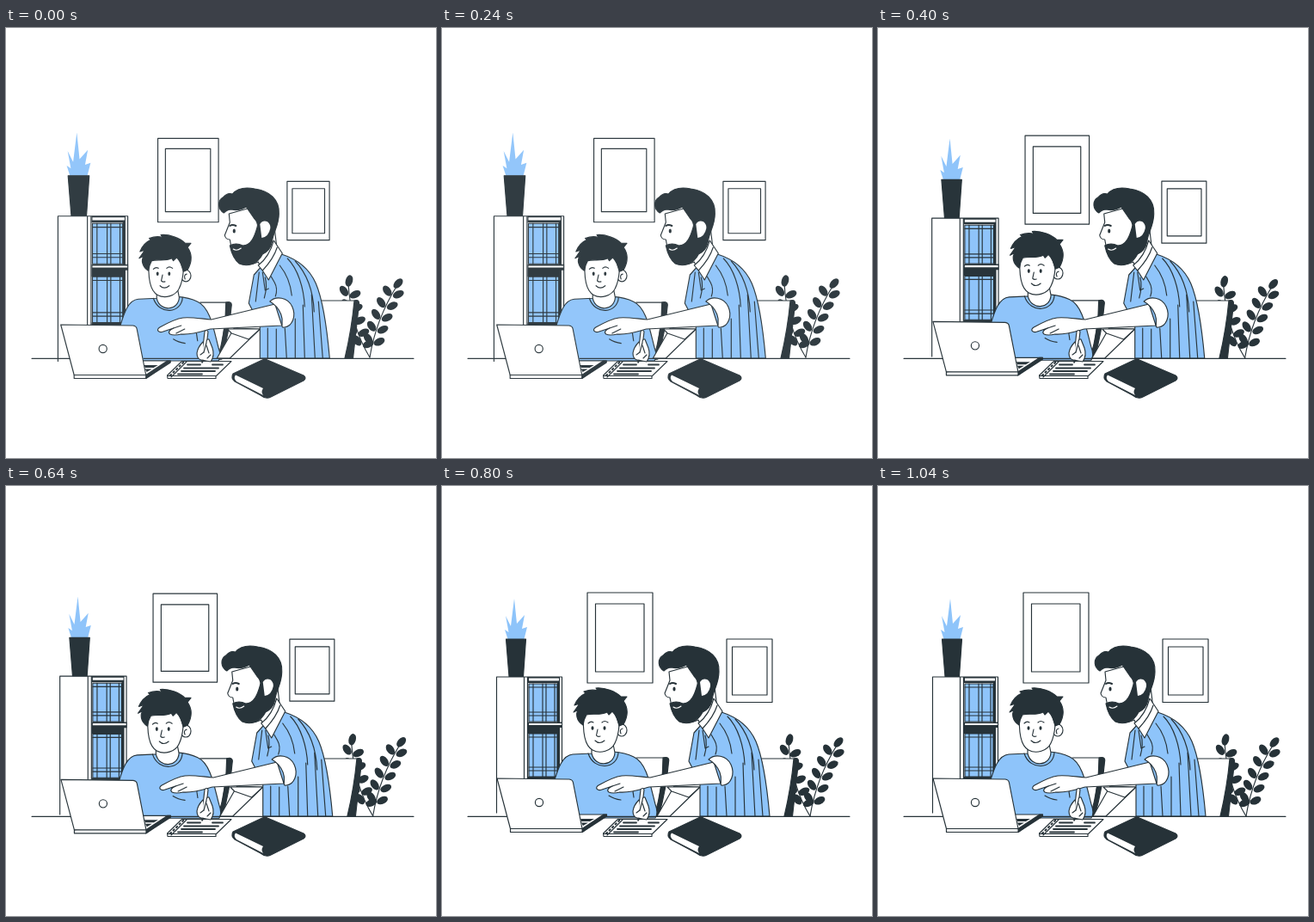
These frames come from a looping animation (500 px wide and 500 px high, 1.2 s). An HTML page:

```html
<!DOCTYPE html>
<html lang="en">
<head>
<meta charset="utf-8">
<title>Homework help</title>
<style>
  html, body { margin: 0; width: 100%; height: 100%; overflow: hidden; background: #fff; }
  svg { display: block; width: 100%; height: 100%; }
  path, rect, circle, ellipse {
    fill: none; stroke: #263238; stroke-width: 1.15;
    stroke-linecap: round; stroke-linejoin: round; vector-effect: non-scaling-stroke;
  }
  .white { fill: #fff; }
  .blue { fill: #8ec4fa; }
  .dark { fill: #263238; }
  .bare { stroke: none; }
</style>
</head>
<body>
<svg id="scene" viewBox="0 0 500 500">
  <g id="pictures">
    <rect x="169" y="124" width="76" height="105"/>
    <rect x="178.5" y="137" width="56.5" height="79"/>
    <rect x="331" y="178" width="53" height="73.5"/>
    <rect x="337.5" y="187" width="40.5" height="56"/>
  </g>

  <g id="shelf">
    <path class="blue bare" d="M84 131L87 160L96 150L93 166L99 164L95.500 178H76.500L73 167L77.500 170L74 151L80 163Z"/>
    <path class="dark" d="M74.500 178H97.500L94.500 221.500H78Z"/>
    <path d="M63.500 380V222H139.500V345M95.500 222V345M99.500 222V345"/>
    <path class="dark bare" d="M100 222H137V345H134V229H100ZM100 274.500H140V281H100ZM100 281H135V288H100ZM100 338H136V345H100Z"/>
    <path class="white bare" d="M101 223.500H136V226.500H101ZM101 276H139V278H101Z"/>
    <g id="books"></g>
  </g>

  <g id="leaves"></g>

  <g id="rightChair">
    <path class="white bare" d="M365 317H410L402 384H365Z"/>
    <path d="M366 317H411"/>
    <path class="dark" d="M409 317Q415 315 414.500 321L407.500 384H398Q406 350 409 317Z"/>
  </g>

  <g id="boy">
    <path class="white" d="M226 316H259L250 384H226"/>
    <path class="dark" d="M257 316Q265 314 263.500 321Q261 352 252 384H247Q257 350 257 316Z"/>
    <path class="blue" d="M174 311L152 312C140 313 135 328 130 345L145 386H248Q252 381 248 370C242 347 238 322 223 315Q213 310 199 309Z"/>
    <path d="M218 338Q222 350 223 362M208 365Q200 364 194 360"/>
    <path class="white" d="M174 303V311C178 328 200 326 201 310L199 300"/>
    <path d="M170 311C177 332 204 329 205 310"/>
    <ellipse class="white" cx="209" cy="284" rx="6" ry="7"/>
    <path class="white" d="M165 262C163 286 166 302 175 307C184 312 197 308 201 299Q205 291 206 278L200 260Z"/>
    <path class="dark" d="M164 278C156 273 155 264 159 260L153 263L160 253L154 255Q158 245 167 241L165 239Q174 236 181 238L179 235C189 234 202 239 208 245L215 245L211 250C218 260 215 270 211 277L206 279Q204 268 198 262L194 266L192 263C184 267 175 264 168 266Q165 271 164 278Z"/>
    <path d="M170 276Q173 273 176 275M186 275Q189 272 193 275M181 283L179.500 290Q181 292 184 291M178 296Q183 301 189 296M210 282Q206 283 208 288"/>
    <ellipse class="dark bare" cx="175" cy="281.500" rx="1.500" ry="2.300"/>
    <ellipse class="dark bare" cx="189" cy="281.500" rx="1.500" ry="2.300"/>
  </g>

  <g id="man">
    <path class="white" d="M270 349L250 384H265L300 350Z"/>
    <path class="white" d="M262 350H300L287 362L267 355Z"/>
    <path class="blue" d="M302 277L293 287L287 320L300 345V384H381C378 350 374 318 365 297C358 281 344 269 325 263Z"/>
    <path d="M299 284L295 318M306 290Q309 300 305 314M313 289L317 296Q321 303 318 312M323 276Q335 291 337 311M332 268C344 280 351 302 352 324M341 271C355 286 362 307 363 330M309 349V384M319 350V384M329 349L331 384M341 338V384M350 322L352 384M360 310L364 384M368 318L373 384"/>
    <path class="white" d="M264 216L265 226L259 241Q260 246 265 246L268 262Q280 281 298 272L302 281L320 259L316 225L300 206Z"/>
    <path class="white" d="M316 247L326 262L310 293L303 282L298 276Q311 266 316 247Z"/>
    <path d="M320 255Q316 268 303 282M303 284L306 305L310 303"/>
    <path class="dark" d="M258 215C251 211 250 201 257 197Q262 191 268 193C274 186 284 185 294 187C311 189 323 200 322 216C322 230 315 238 314 249Q312 259 303 263C297 275 285 278 276 274Q268 268 265 253Q272 249 280 253C290 253 294 242 297 231Q298 226 293 221L284 208Q276 213 267 211Q262 211 258 215Z"/>
    <path class="white bare" d="M300 228C304 221 313 225 312 233Q310 243 302 244Z"/>
    <path style="stroke-width:2" d="M265 230Q268 228 272 230"/>
    <ellipse class="dark bare" cx="270" cy="236" rx="1.600" ry="2.600"/>
    <path style="stroke:#fff" d="M269 257Q273 260 278 256"/>
  </g>

  <path d="M30 384.300H79M160 384.300H474"/>

  <g id="arm">
    <path class="white" d="M316 321L242 339C229 338 219 336 209 337C200 338 191 343 182 348C177 351 181 355 186 353L198 349Q190 353 194 356Q198 358 207 356C219 357 230 353 241 350L324 346Z"/>
    <path d="M198 349L207 346M201 355L211 350"/>
    <path class="white" d="M310 318C317 311 331 313 336 324C341 335 336 347 327 348C321 349 327 343 323 333Q319 323 310 318Z"/>
  </g>

  <g id="laptop">
    <path class="white" d="M79.500 398.500L158 382H191.500L163 402.500H79.500Z"/>
    <path class="dark" d="M163 398.500L188 382H191.500V384L163 402.500Z"/>
    <path class="dark bare" d="M161 387H177L172 390H162ZM162 391.500H170L164 395Z"/>
    <path class="white" d="M64 340L148 341Q152 341.500 152.500 345L163 398.500H79.500Z"/>
    <circle cx="113" cy="368" r="4.600"/>
  </g>

  <path class="white" d="M187.500 404L204.500 387.500H262L244 405V407.500H188Z"/>
  <path d="M187.500 404.500H244M192 406L210 388"/>
  <path style="stroke-width:1.800" d="M211 391.500H226M240 391.500H252M207 395.500H247M204 399H243M200 402.500H228"/>
  <path style="stroke-width:2;stroke-dasharray:1.500 3.500" d="M191 404L207 388"/>
  <path class="white" d="M231 353Q233 350 235 353L231.500 385L228 389L227.500 384Z"/>
  <path class="white" d="M229 365Q223 371 222 378Q222 385 227 386L238 388Q243 381 240 372L236 362Q233 361 233 366L230 377"/>
  <path d="M233 369L236 378M230 377L226 380M229 386L228 389M234 384L238 380"/>

  <path class="dark" d="M264 402L299 385.500Q301 384.500 304 386L346 404Q350 407 346 410L308 429Q302 432 296 427L266 411Q261 407 264 402Z"/>
  <path class="white bare" d="M267 403.500L299 419Q296 423 299 427L268 411Q264 407 267 403.500Z"/>
</svg>
<script>
const byId = id => document.getElementById(id);

function add(parent, tag, attributes) {
  const node = document.createElementNS("http://www.w3.org/2000/svg", tag);
  for (const name in attributes) node.setAttribute(name, attributes[name]);
  byId(parent).append(node);
}

// Two rows of ring binders
for (const [top, bottom] of [[230, 274], [288, 338]]) {
  add("books", "rect", { class: "blue", x: 101, y: top, width: 33, height: bottom - top });
  for (const x of [106, 117, 121, 131]) {
    add("books", "path", { d: `M${x} ${top}V${bottom}` });
  }
  for (const y of [top + 4, bottom - 11, bottom - 7]) {
    add("books", "path", { d: `M101 ${y}H134` });
  }
}

function leaf(x, y, angle) {
  add("leaves", "ellipse", {
    class: "dark bare", rx: 6.8, ry: 4.2, transform: `translate(${x} ${y}) rotate(${angle})`
  });
}

// Leaf pairs hang on a quadratic stem between two points
function branch(from, bend, to, pairs) {
  add("leaves", "path", { d: `M${from}Q${bend} ${to}` });
  for (let i = 0; i < pairs; i++) {
    const t = 0.22 + 0.66 * i / (pairs - 1);
    const [x, y] = [0, 1].map(k =>
      (1 - t) ** 2 * from[k] + 2 * t * (1 - t) * bend[k] + t * t * to[k]);
    leaf(x - 6, y - 3, 55);
    leaf(x + 7, y + 1, -25);
  }
}
branch([428, 384], [435, 340], [460, 300], 5);
leaf(461, 298, -48);
branch([428, 384], [406, 348], [403, 298], 5);
leaf(404, 295, -75);

// w falls from 1 to 0 as the scene settles
const zoom = (x, y, amount) => w =>
  `translate(${x} ${y}) scale(${1 + amount * w}) translate(${-x} ${-y})`;
const shift = (x, y) => w => `translate(${x * w} ${y * w})`;

const motions = {
  pictures: zoom(274, 184, -0.072),
  shelf: zoom(108.5, 270, 0.068),
  leaves: shift(-5, -1),
  rightChair: shift(-4, 0),
  boy: zoom(215, 420, -0.03),
  man: shift(-4.7, 0),
  arm: shift(-3.2, 0),
  laptop: shift(-0.3, 5)
};
const weights = [1, 0.27, 0];

function draw(now) {
  const weight = weights[Math.floor(now % 1200 / 400)];
  for (const id in motions) byId(id).setAttribute("transform", motions[id](weight));
  byId("scene").style.opacity = 1 - 0.05 * weight;
  requestAnimationFrame(draw);
}
draw(0);
</script>
</body>
</html>
```
